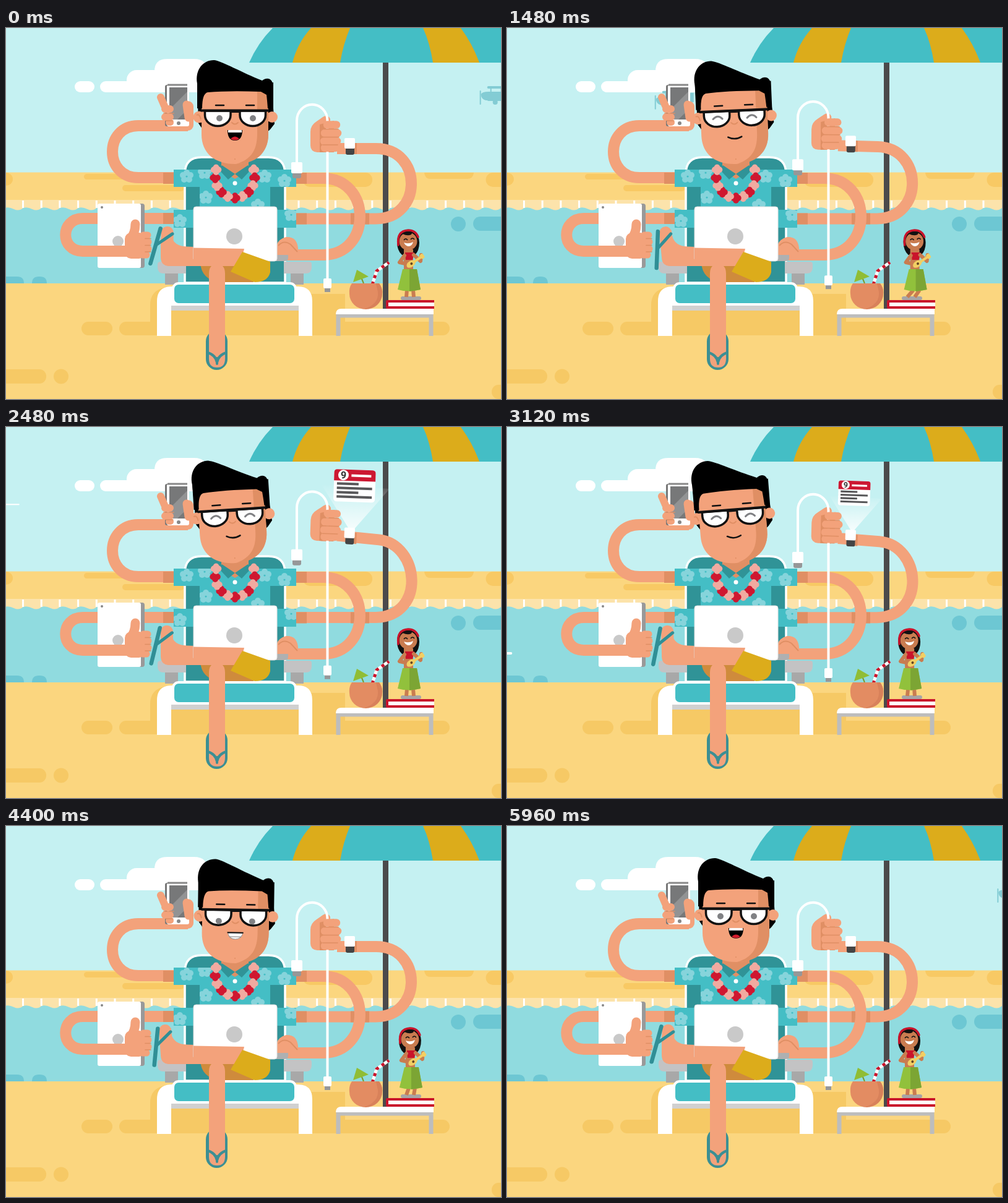
Write an HTML page that moves like this. It is 800 by 600 pixels and loops after 6000 ms.

```html
<!DOCTYPE html>
<html lang="en">
<head>
<meta charset="utf-8">
<title>Beach office</title>
<style>
html, body { margin: 0; width: 100%; height: 100%; overflow: hidden; background: #c5f1f2 }
svg { display: block; width: 100%; height: 100% }
.limb { fill: none; stroke: #f3a27b; stroke-width: 18; stroke-linejoin: round }
.round { stroke-linecap: round }
.shade { fill: none; stroke: #e08f64; stroke-width: 18 }
.line { fill: none; stroke-linecap: round; stroke-linejoin: round }
.skin { fill: #f3a27b }
.dark { fill: #e08f64 }
</style>
</head>
<body>
<svg viewBox="0 0 800 600">
  <defs>
    <g id="clover"><circle cx="-3.8" r="4.9"/><circle cx="3.8" r="4.9"/><circle cy="-3.8" r="4.9"/><circle cy="3.8" r="4.9"/></g>
    <g id="bloom" fill="#86d4db"><circle cy="-6" r="5"/><circle cx="6" cy="-2" r="5"/><circle cx="4" cy="5" r="5"/><circle cx="-4" cy="5" r="5"/><circle cx="-6" cy="-2" r="5"/></g>
    <clipPath id="shirt"><path d="M271 229H469V257H427V294H469V323H271V294H313V257H271Z"/></clipPath>
    <linearGradient id="beam" x1="0" y1="0" x2="0" y2="1"><stop offset="0" stop-color="#fff" stop-opacity="0"/><stop offset="1" stop-color="#fff" stop-opacity=".85"/></linearGradient>
  </defs>

  <!-- scenery -->
  <rect width="800" height="235" fill="#c5f1f2"/>
  <rect y="233.500" width="800" height="60" fill="#fbd67f"/>
  <g fill="#f8c964">
    <path d="M0 234a11 10.500 0 0 1 0 21ZM676 234H756q-1 10-11 10H686q-9 0-10-10ZM800 234H787a11 11 0 0 0 0 23H800Z"/>
    <rect x="126" y="236" width="150" height="9" rx="4.500"/><rect x="188" y="254" width="100" height="10" rx="5"/><rect x="480" y="234" width="112" height="23" rx="11"/>
  </g>
  <rect y="290" width="800" height="124" fill="#90dbdf"/>
  <g id="foam"></g>
  <g fill="#6dc7d3">
    <path d="M0 402H18q11 0 11 11H0ZM42 413q0-11 11-11h2q11 0 11 11Z"/>
    <circle cx="731" cy="317" r="12"/><rect x="755" y="305" width="80" height="23" rx="11.500"/>
  </g>
  <g id="wake" fill="#fff"><rect x="-14" y="364" width="14" height="4" rx="2"/><circle cx="-35" cy="372" r="1.800"/><circle cx="-23" cy="362" r="2"/><circle cx="-23" cy="374" r="2"/><circle cx="-24" cy="385" r="1.800"/></g>
  <rect y="413" width="800" height="187" fill="#fbd67f"/>
  <g fill="#f6c965">
    <rect x="122" y="475" width="50" height="22" rx="11"/><rect x="183" y="475" width="534" height="22" rx="11"/>
    <path d="M233 497V448q0-27 30-29H480V430H548V497Z"/>
    <rect x="-20" y="552" width="85" height="23" rx="11"/><circle cx="89" cy="563.500" r="12"/><rect x="785" y="577" width="40" height="23" rx="11"/>
  </g>
  <g fill="#fff">
    <rect x="111" y="86" width="32" height="18" rx="9"/><rect x="152" y="86" width="174" height="18" rx="9"/>
    <rect x="195" y="68" width="100" height="36" rx="16"/><path d="M240 90V70q0-20 20-20H304q22 0 22 22V104H240Z"/>
  </g>
  <g id="plane">
    <g fill="#83ccd4">
      <rect y="7" width="2" height="23" rx="1"/><rect x="12" width="34" height="4" rx="2"/><path d="M17 3h2v20h-2ZM34 3h2v20h-2Z"/>
      <path d="M2 13Q4 9 14 9H40L53 10 58 3H63V18L38 23H10Q2 21 2 13Z"/><rect x="12" y="20" width="30" height="4" rx="2"/><circle cx="25" cy="26" r="4"/>
    </g>
    <path d="M82 11H103M76 17H94M101 17H110M117 18H138" stroke="#fff" stroke-width="2" class="line"/>
  </g>
  <rect x="609" y="50" width="9" height="405" fill="#4b4a4b"/>
  <path d="M393 56Q407 24 431 0H800V56Z" fill="#44bec5"/>
  <path d="M463 56Q471 24 493 0H556Q545 26 540 56ZM690 56Q685 24 674 0H735Q754 26 765 56Z" fill="#dcac1b"/>

  <!-- table -->
  <path d="M537 498V465H687V498" fill="none" stroke="#bdbdbd" stroke-width="7"/>
  <path d="M533 463q0-9 9-9H691V463Z" fill="#fff"/>
  <path d="M692 442H616V452H692" fill="#fff" stroke="#c9142b" stroke-width="4" stroke-linejoin="round"/>
  <path d="M578 413 571 396" stroke="#7c9a2d" stroke-width="2"/><path d="M561 411 567 391 586 402Z" fill="#90bd35"/>
  <path d="M592 415 599 393 619 379" fill="none" stroke="#fff" stroke-width="5"/><path d="M592 415 599 393 619 379" fill="none" stroke="#c9142b" stroke-width="5" stroke-dasharray="5 6"/>
  <path d="M559 413H603Q609 421 608 430A26.500 25 0 0 1 555 430Q554 420 559 413Z" fill="#e38c62"/><path d="M598 413H603Q609 421 608 430A26 25 0 0 1 580 454Q603 446 601 427Z" fill="#d8815a"/>

  <!-- hula doll -->
  <rect x="638" y="434" width="33" height="6" rx="3" fill="#a7a5a6"/>
  <path id="dollLegs" stroke="#c97c50" stroke-width="6"/>
  <g id="doll">
    <path d="M632 346Q633 327 650 327 667 327 668 347 668 360 661 367H640Q632 360 632 346Z" fill="#111"/>
    <rect x="643" y="358" width="15" height="34" fill="#c97c50"/>
    <circle cx="650" cy="345" r="14.500" fill="#c97c50"/><path d="M640 328H658L655 334Q649 337 641 333Z" fill="#111"/>
    <path d="M634 351Q631 328 650 327 662 327 666 338" class="line" stroke="#c9142b" stroke-width="3.500"/>
    <path d="M643 343q3-4 6 0M654 342q3-4 6 0" fill="none" stroke="#111" stroke-width="1.500"/><path d="M643 347Q651 350 658 346 656 353 651 353 646 353 643 347Z" fill="#fff"/>
    <path d="M645 363H660L657 375H646Z" fill="#c9142b"/>
    <path d="M644 368 636 379 650 382M659 367 670 377 671 367" class="line" stroke="#c97c50" stroke-width="6"/>
    <g transform="rotate(-35 657 380)" fill="#f2cf63"><ellipse cx="654" cy="380" rx="8" ry="5"/><rect x="659" y="378" width="15" height="4"/><rect x="673" y="376" width="6" height="8" rx="2"/><circle cx="655" cy="380" r="2" fill="#634525"/></g>
    <path d="M641 390H664L670 423Q651 428 633 423Z" fill="#91c13c"/><path d="M652 390H664L670 423 652 426Z" fill="#7ca534"/>
  </g>

  <!-- chair -->
  <path d="M257 395H278V415H257ZM460 395H481V415H460Z" fill="#a8a8a8"/>
  <path d="M289 412V236Q289 209 316 209H424Q451 209 451 236V412Z" fill="#309397" stroke="#fff" stroke-width="3.500"/>
  <path d="M245 382q0-4 5-4H291V397H255q-10 0-10-10ZM449 378H490q4 0 4 4V387q0 10-10 10H449Z" fill="#c3c3c4"/>
  <rect x="262" y="445" width="218" height="12" fill="#d0d0d0"/>
  <path d="M244 498V442Q244 418 268 418H472Q495 418 495 442V498H473V449H267V498Z" fill="#fff"/>
  <rect x="270" y="413" width="198" height="34" rx="9" fill="#44bec5" stroke="#fff" stroke-width="4"/>

  <!-- arms -->
  <path id="watchArm" class="limb"/>
  <path d="M469 308.500H486M557 308.500H587" class="shade"/>
  <path d="M469 243H512C592 243 592 367 512 367H450" class="limb"/>
  <path d="M469 243H486" class="shade"/>
  <path id="phoneArm" class="limb"/>
  <path id="padArm" class="limb"/>
  <path d="M271 243H254M271 308H254" class="shade"/>

  <!-- body -->
  <path d="M348 205H392V228L370 246 348 228Z" class="dark"/>
  <path d="M271 229H345L370 244 395 229H469V257H427V294H469V323H271V294H313V257H271Z" fill="#44bec5"/>
  <g clip-path="url(#shirt)" id="blooms"></g>
  <path d="M349 222 370 236 391 222 396 229 381 245 370 236 359 245 344 229Z" fill="#309397"/>
  <circle cx="370" cy="251" r="3.500" fill="#fff"/>
  <g id="lei"></g>

  <!-- legs and laptop -->
  <path d="M314 380H400V411H345Q316 407 314 380Z" fill="#cf8b3c"/>
  <rect x="323" y="489" width="35" height="64" rx="17.500" fill="#3c8f93"/>
  <path d="M328 397Q328 382 341 382 354 382 354 397V535Q354 549 341 549 328 549 328 535Z" class="skin"/>
  <path d="M326 525Q339 529 341 541Q343 529 356 525M341 534V543" class="line" stroke="#3c8f93" stroke-width="4"/>
  <g id="foot"><path d="M257 331 260 370" class="limb round" style="stroke-width:20"/></g>
  <path d="M250 340 267 336Q271 353 292 353.500L390 357 380 385H262Q250 384 250 370Z" class="skin"/>
  <g id="sandal" class="line" stroke="#308f96"><path d="M243 330V389" stroke-width="6.500"/><path d="M244 357 264 333" stroke-width="5"/></g>
  <path d="M437 352Q440 341 453 338 470 337 472 356V376H437Z" class="skin"/><path d="M440 352Q449 342 460 350L471 362" fill="none" stroke="#e08f64" stroke-width="2"/>
  <path d="M430 367H456V372q0 5-5 5H430Z" fill="#aeb0b1"/>
  <rect x="303" y="289" width="135" height="88" rx="4" fill="#fff" stroke="#dedede"/>
  <circle cx="369" cy="337" r="13" fill="#c9c9c9"/>
  <path d="M303 355.500 385 357 378 384H303Z" class="skin"/>
  <path d="M382 362 427 378V395Q423 411 402 411L363 394Z" fill="#dcac1b"/>

  <!-- tablet -->
  <g id="pad">
    <path d="M216 284H220Q224 284 224 288V384Q224 388 220 388H216Z" fill="#999"/><rect x="148" y="284" width="70" height="104" rx="3" fill="#fff"/>
    <circle cx="155" cy="290" r="2" fill="#888"/><circle cx="181" cy="345" r="9" fill="#c9c9c9"/>
  </g>
  <path id="padWrist" class="limb"/>
  <g id="padHand" class="line" stroke="#f3a27b">
    <path d="M209 317Q209 332 200 343" stroke-width="15"/><rect x="192" y="331" width="33" height="42" rx="10" fill="#f3a27b" stroke="none"/>
    <path d="M222 335H229M222 346H230M222 357H230M222 367H227" stroke-width="11"/><path d="M225 340.500H234M225 351.500H234M225 362H234" stroke="#e08f64" stroke-width="1.500"/>
  </g>

  <!-- phone -->
  <g id="phone">
    <path d="M294 127V157" class="limb round"/>
    <rect x="257" y="92" width="14" height="67" rx="3" fill="#777"/><rect x="260" y="92" width="36" height="67" rx="3" fill="#fff"/><path d="M261 92H293" stroke="#888" stroke-width="3"/>
    <rect x="264" y="96" width="29" height="52" fill="#777879"/><path d="M293 103V132L277 148H264V132Z" fill="#929394"/><circle cx="279" cy="154" r="3" fill="#888"/>
    <path d="M292 124 295 145" class="limb round" style="stroke-width:13"/>
    <g class="line" stroke="#f3a27b" stroke-width="12"><path d="M250 112 256 126M257 131H265M257 144H265"/><path d="M263 153H266" stroke-width="10"/><path d="M255 138H271M258 150H270" stroke="#e08f64" stroke-width="1.500"/></g>
  </g>

  <!-- cable, fist and watch -->
  <path id="beamShape" d="M555 166 509 92 620 100 562 166Z" fill="url(#beam)"/>
  <g id="card">
    <rect x="528" y="69" width="67" height="52" rx="5" fill="#fff"/><path d="M528 87V74q0-5 5-5H590q5 0 5 5V87Z" fill="#cc1832"/>
    <circle cx="543" cy="78" r="8.500" fill="#fff"/><text x="543" y="83.500" text-anchor="middle" font-family="Roboto, sans-serif" font-size="16" font-weight="700" fill="#333">9</text>
    <path d="M556 78.500H588" stroke="#fff" stroke-width="4"/><path d="M533 92H568M533 99H590M533 106H568M533 113H590" stroke="#58585a" stroke-width="4"/>
  </g>
  <g id="palm"><path d="M492 190V168Q492 157 502 151L512 144Q520 139 524 147V201H503Q492 200 492 190Z" class="skin"/><path d="M507 156V201H530V150Z" class="dark"/></g>
  <g id="cable">
    <path d="M470 218V150A24.500 26 0 0 1 519.500 150V406" fill="none" stroke="#fff" stroke-width="4"/>
    <path d="M463 234H477V240q0 3-3 3H466q-3 0-3-3ZM515 420H524V427H515Z" fill="#969798"/><rect x="461" y="217" width="18" height="18" rx="2" fill="#fff"/><rect x="513" y="405" width="13" height="16" rx="2" fill="#fff"/>
  </g>
  <g id="fist">
    <g class="line" stroke="#f3a27b" stroke-width="12.500"><path d="M519 156.500H534M515 170H536M514 183H535M515 194H532"/></g>
    <path d="M514 163.500H537M511 176.500H538M512 189H536" class="line" stroke="#e08f64" stroke-width="1.500"/>
    <rect x="563" y="186" width="4" height="18" class="dark"/><path d="M549 192H563V202q0 3-3 3H552q-3 0-3-3Z" fill="#444"/><rect x="547" y="178" width="17" height="17" rx="2" fill="#fff"/>
  </g>

  <!-- head -->
  <g id="head">
    <path d="M309 88H432V130L434 155 427 164 420 170H322L311 154Z"/>
    <circle cx="312" cy="144" r="9.500" class="skin"/><circle cx="430" cy="144" r="9" class="skin"/><path d="M308 141Q313 138 315 148" fill="none" stroke="#e08f64" stroke-width="2"/>
    <path d="M316 100H424V172C424 203 402 220 370 220S316 203 316 172Z" class="skin"/><path d="M406 100H424V172C424 203 402 220 372 220 398 212 406 196 406 170Z" class="dark"/>
    <path d="M309 130V90C305 66 320 51 337 52 350 54 381 72 414 85 423 78 432 83 431 94V130H423Q422 116 421 108L412 103Q360 101 326 104 317 106 317 130Z"/>
    <path d="M339 125H352M388 125H401" class="line" stroke="#111" stroke-width="2.500"/>
    <path d="M321.500 134H363V141A20.700 17.500 0 0 1 321.500 141ZM378 134H419.500V141A20.700 17.500 0 0 1 378 141Z" fill="#fff" stroke="#111" stroke-width="3.500"/>
    <g id="pupils" fill="#808184"><circle cx="345" cy="146" r="5"/><circle cx="399" cy="146" r="5"/></g>
    <path id="squint" d="M336 146q8-8 15 0M391 146q8-8 15 0" class="line" stroke="#808184" stroke-width="3"/>
    <path d="M315 133.500H425M363 135H378" stroke="#111" stroke-width="4"/>
    <path d="M365 153Q370 158 375 153" class="line" stroke="#e08f64" stroke-width="2"/><circle cx="370" cy="212" r="1" class="dark"/>
    <g id="talk"><path d="M358 165H382Q382 182 370 182T358 165Z"/><path d="M359 165H381V169H359Z" fill="#fff"/><path d="M363 179Q370 172 377 179 370 184 363 179Z" fill="#d31b2c"/></g>
    <path id="smile" d="M359 176Q370 182 381 176" class="line" stroke="#111" stroke-width="2.500"/>
    <g id="grin"><path d="M358 171H382Q380 181 370 181T358 171Z" fill="#fff" stroke="#999"/><path d="M357 170.500H383" stroke="#111" stroke-width="2"/><path d="M361 177H379" stroke="#777"/></g>
  </g>
</svg>
<script>
const LOOP = 6000, el = {};
document.querySelectorAll('[id]').forEach(e => el[e.id] = e);

const move = (name, value) => el[name].setAttribute('transform', value);
const draw = (name, d) => el[name].setAttribute('d', d);
const show = (name, on) => el[name].setAttribute('visibility', on ? 'visible' : 'hidden');

// Eased value at t from [time, value, time, value, ...]
function key(t, k) {
  for (let i = 2; i < k.length; i += 2) if (t < k[i]) {
    const u = Math.max(0, (t - k[i - 2]) / (k[i] - k[i - 2]));
    return k[i - 1] + (k[i + 1] - k[i - 1]) * u * u * (3 - 2 * u);
  }
  return k[k.length - 1];
}

// Blend two paths of the same structure
function mix(a, b, p) {
  const to = b.match(/-?[\d.]+/g);
  let i = 0;
  return a.replace(/-?[\d.]+/g, n => (+n + (to[i++] - n) * p).toFixed(2));
}

let foam = 'M0 278H800V291', seams = '';
for (let x = 800; x > -30; x -= 29.7) {
  foam += 'q-7 6-15 2t-14.700-2';
  seams += `M${x - 30} 279V291`;
}
el.foam.innerHTML = `<path d="${foam}V278Z" fill="#fce3ab"/><path d="${seams}" stroke="#fff" stroke-width="3"/>`;

el.blooms.innerHTML = [[292, 240], [323, 274], [321, 234], [407, 287], [418, 240], [450, 247], [281, 312], [461, 302]]
  .map(([x, y]) => `<use href="#bloom" x="${x}" y="${y}"/>`).join('');

for (let i = 0; i < 11; i++) {
  const a = (-18 + 21.6 * i) * Math.PI / 180;
  el.lei.innerHTML += `<use href="#clover" x="${370 + 32 * Math.cos(a)}" y="${240 + 35 * Math.sin(a)}" fill="${i % 2 ? '#cf1730' : '#f1aaa0'}"/>`;
}

function render(t) {
  const beat = (1 - Math.cos(t * Math.PI / 300)) / 2;
  const planeX = t > 5900 ? 793 - (t - 5960) * .67 : 766 - t * .356;
  move('plane', `translate(${planeX} ${94 + (t > 5900 ? 0 : t * .0053)})`);
  move('wake', `translate(${8 + (t - 3120) * .368})`);

  const sway = 9 * beat ** 4;
  move('doll', `translate(${sway})`);
  draw('dollLegs', `M${648 + sway} 424 647 435M${658 + sway} 424 659 435`);

  const tilt = 16 - 14 * beat;
  move('foot', `rotate(${tilt * .45 - 2} 262 372)`);
  move('sandal', `translate(0 ${-.4 * tilt}) rotate(${tilt} 244 354)`);

  const call = key(t, [350, 0, 700, 1, 1050, 1, 1400, 0]);
  draw('phoneArm', mix('M271 242C250 242 230 242 214 242C158 242 158 158 214 158C240 158 270 158 294 158',
    'M271 240C250 239 225 238 209 234C158 219 158 175 200 157C230 145 250 140 291 139', call));
  move('phone', `translate(${-2 * call} ${-21 * call}) rotate(${7 * call} 294 158)`);

  const read = key(t, [4550, 0, 4950, 1, 5480, 1, 5920, 0]);
  draw('padArm', mix('M271 308C230 308 160 308 124 308C87 308 87 361 124 361L200 361',
    'M271 308C225 309 160 320 118 328C82 336 88 384 126 371L205 334', read));
  draw('padWrist', mix('M124 361L200 361', 'M126 371L205 334', read));
  move('pad', `translate(${read} ${-22 * read}) rotate(${-9.5 * read} 186 336)`);
  move('padHand', `translate(${-2 * read} ${-29 * read}) rotate(${-10 * read} 212 345)`);

  const lift = key(t, [1380, 0, 1700, 1, 2300, 1, 3080, .76, 3150, .74, 3400, 0]);
  draw('watchArm', mix('M469 308.500L598 308.500C674 308 674 195 598 195L535 195',
    'M469 308L598 308C680 305 668 190 603 182L535 175', lift));
  const raise = `translate(0 ${-17 * lift}) rotate(${2 * lift} 520 180)`;
  move('fist', raise);
  move('palm', raise);
  move('cable', `translate(0 ${-20 * lift})`);

  const size = key(t, [1480, 0, 1780, 1, 2900, 1, 3120, .77, 3300, 0]);
  show('card', size > .01);
  show('beamShape', size > .01);
  move('card', `translate(554 147) scale(${size}) rotate(2) translate(-554 -147)`);
  move('beamShape', `translate(558 ${166 + 4 * (1 - size)}) scale(${size}) translate(-558 -166)`);

  const turn = key(t, [300, 0, 800, 3, 1100, 3, 1500, -2.5, 1950, -2.5, 2900, -4.5, 3150, -4.5, 3600, .8, 4500, .8, 4950, 10, 5450, 10, 5900, 0]);
  const nod = key(t, [3300, 0, 3650, 2, 5450, 2, 5900, 0]);
  move('head', `translate(0 ${nod}) rotate(${turn} 370 215)`);

  const watching = t > 1480 && t < 3400, busy = t >= 3400 && t < 5750;
  show('pupils', !watching);
  show('squint', watching);
  show('talk', !watching && !busy);
  show('smile', watching);
  show('grin', busy);
  const glance = key(t, [350, 0, 700, -3, 1100, -3, 1400, 0]);
  move('pupils', `translate(${-nod} ${glance + 3 * nod})`);
  move('talk', `translate(0 165) scale(1 ${1 - .2 * beat}) translate(0 -165)`);
}

const start = performance.now();
function tick() {
  render((performance.now() - start) % LOOP);
  requestAnimationFrame(tick);
}
tick();
</script>
</body>
</html>
```
